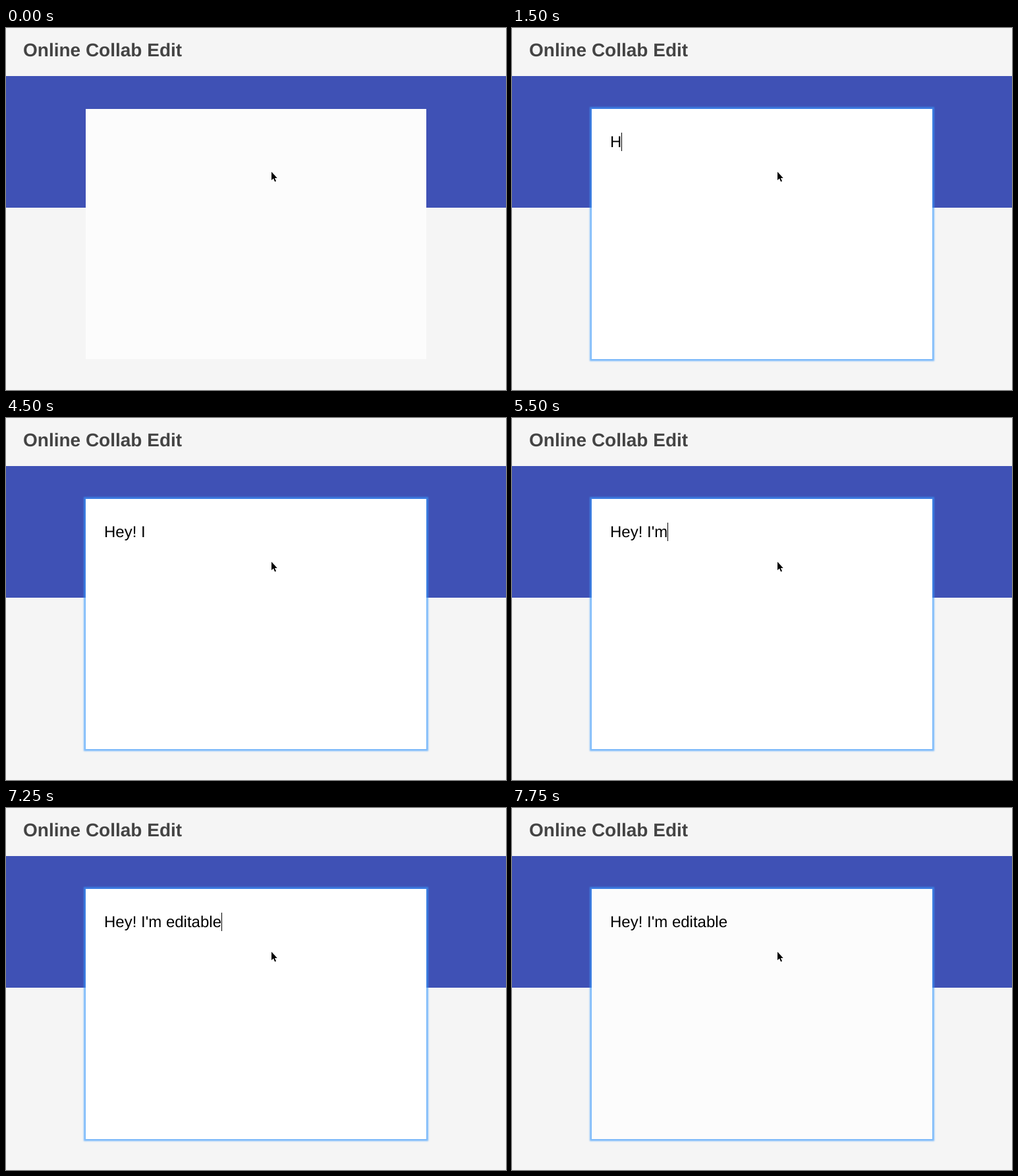
These frames come from a looping animation (759x550 px, 8000 ms). An HTML page:

```html
<!DOCTYPE html>
<html lang="en">
<head>
<meta charset="utf-8">
<title>Collab editor</title>
<style>
  html, body { margin: 0; width: 759px; height: 550px; overflow: hidden; background: #f5f5f5; }
  .band { position: absolute; left: 0; top: 73px; width: 759px; height: 200px; background: #3f51b5; }
  .card { position: absolute; left: 121px; top: 123px; width: 517px; height: 380px; background: #fcfcfc; }
  .card.focus { box-shadow: 0 0 2px 3px rgba(59, 153, 252, .65); }
  .card.bright { background: #fff; }
  svg { position: absolute; left: 0; top: 0; }
  text { font-family: "Liberation Sans", Arial, sans-serif; font-kerning: none; text-rendering: geometricPrecision; white-space: pre; }
  .title { font-size: 28px; font-weight: 700; fill: #444; }
  .typed { font-size: 24px; }
</style>
</head>
<body>
<div class="band"></div>
<div class="card" id="card"></div>
<svg width="759" height="550" viewBox="0 0 759 550">
  <text class="title" x="26" y="43">Online Collab Edit</text>
  <text class="typed" id="typed" x="149" y="181"></text>
  <rect id="caret" y="159" width="1" height="28" shape-rendering="crispEdges"/>
  <path d="M403 219.5V232l2.9-2.7 2.3 5 2-.9-2.2-4.9h4z" fill="#000" opacity=".16"/>
  <path d="M403 218.5V231.300l2.900-2.700 2.200 5 1.900-.8-2.100-4.900h3.800z"
        fill="#000" stroke="#fff" stroke-width="1.600" stroke-linejoin="round" paint-order="stroke"/>
</svg>
<script>
  const LOOP = 8000, FOCUS = 500, DIM = 7500, BLINK = 500, START_X = 149;

  // [time, characters typed at that time]
  const keys = [
    [FOCUS, ""], [1500, "H"], [1750, "e"], [2000, "y"], [3000, "!"], [3250, " "],
    [4000, "I"], [5250, "'"], [5500, "m"], [5750, " "], [6000, "e"], [6250, "di"],
    [6500, "t"], [6750, "a"], [7000, "b"], [7250, "le"]
  ];

  const [card, typed, caret] = ["card", "typed", "caret"].map(id => document.getElementById(id));
  const ruler = document.createElement("canvas").getContext("2d");
  ruler.font = '24px "Liberation Sans", Arial, sans-serif';
  ruler.fontKerning = "none";

  function draw() {
    const t = performance.now() % LOOP;
    const done = keys.filter(([time]) => time <= t);
    const text = done.map(([, chars]) => chars).join("");
    const focused = done.length > 0;

    card.classList.toggle("focus", focused);
    card.classList.toggle("bright", focused && t < DIM);
    if (typed.textContent !== text) typed.textContent = text;

    // The blink restarts with every key press.
    const idle = focused ? t - done[done.length - 1][0] : 0;
    const shown = focused && idle % (2 * BLINK) < BLINK;
    caret.setAttribute("x", Math.round(START_X + ruler.measureText(text).width));
    caret.setAttribute("visibility", shown ? "visible" : "hidden");
    requestAnimationFrame(draw);
  }
  draw();
</script>
</body>
</html>
```
